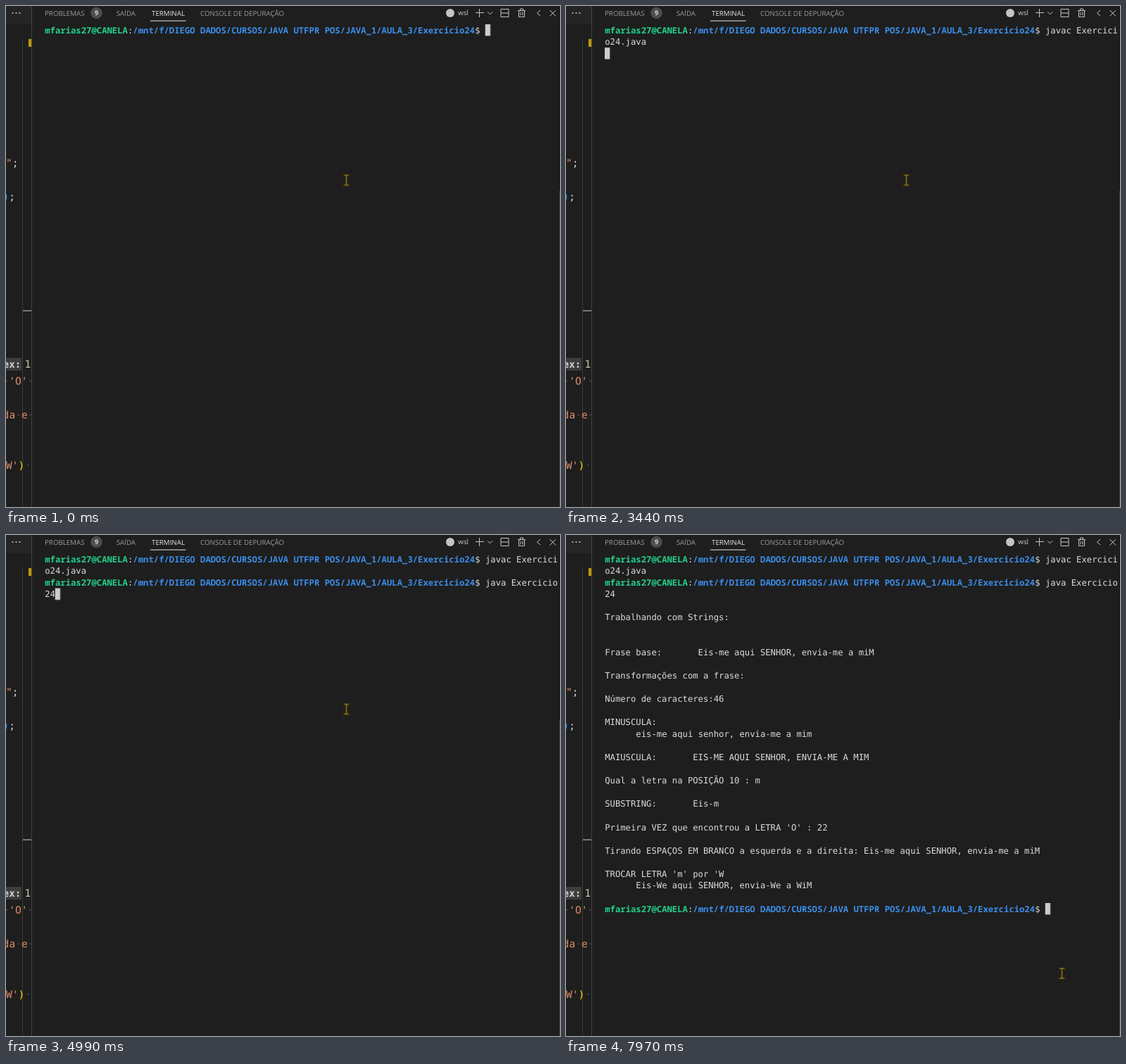
An HTML page that plays this animation: 787 px wide and 712 px high, repeating every 8000 ms.

```html
<!DOCTYPE html>
<html lang="pt-BR">
<head>
<meta charset="utf-8">
<title>Terminal</title>
<style>
  html, body { margin: 0; width: 100%; height: 100%; overflow: hidden; background: #1e1e1e; }
  svg { display: block; --cw: 7.362px; --lh: 16.567px; }
  text { white-space: pre; text-rendering: geometricPrecision; }

  .tabs { font: 9.75px "Open Sans", "Noto Sans", sans-serif; fill: #9d9d9d; }
  .tabs .on { fill: #e7e7e7; }
  .icons { fill: none; stroke: #c5c5c5; stroke-width: 1; }
  .code { font: 14.6px "DejaVu Sans Mono", "Noto Sans Mono", monospace; fill: #d4d4d4; }
  .str { fill: #dd8c6a; }
  .dot { fill: #484848; }
  .term { font: 12.23px "DejaVu Sans Mono", "Noto Sans Mono", monospace; fill: #dcdcdc; }
  .user, .path { font: 700 12.27px "Noto Sans Mono", "DejaVu Sans Mono", monospace; }
  .user { fill: #23d18b; }
  .path { fill: #3b8eea; }

  .run, .block, .mouse { animation: 8s step-end infinite; }
  .java1 { animation-name: java1; }
  .javac1 { animation-name: javac1; }
  .prompt2 { animation-name: prompt2; }
  .javac2 { animation-name: javac2; }
  .java2 { animation-name: java2; }
  .output { animation-name: output; }
  .block { fill: #cccccc; animation-name: block; }
  .mouse { fill: none; stroke: #c79a0c; stroke-width: 1.1; animation-name: mouse; }

  @keyframes java1 { 0%, 19.5%, 100% { opacity: 0 } 1.5% { opacity: 1 } }
  @keyframes javac1 { 0% { opacity: 0 } 19.5%, 100% { opacity: 1 } }
  @keyframes prompt2 { 0% { opacity: 0 } 50.875%, 100% { opacity: 1 } }
  @keyframes javac2 { 0%, 62.375%, 100% { opacity: 0 } 55.875% { opacity: 1 } }
  @keyframes java2 { 0% { opacity: 0 } 62.375%, 100% { opacity: 1 } }
  @keyframes output { 0% { opacity: 0 } 68.75%, 100% { opacity: 1 } }

  @keyframes block {
    0% { transform: translate(calc(85 * var(--cw)), 0px) }
    1.5% { transform: translate(calc(2 * var(--cw)), var(--lh)) }
    19.5% { transform: translate(calc(9 * var(--cw)), var(--lh)) }
    43% { transform: translate(0px, calc(2 * var(--lh))) }
    50.875% { transform: translate(calc(85 * var(--cw)), calc(2 * var(--lh))) }
    55.875% { transform: translate(calc(9 * var(--cw)), calc(3 * var(--lh))) }
    62.375% { transform: translate(calc(2 * var(--cw)), calc(3 * var(--lh))) }
    68.75%, 100% { transform: translate(calc(85 * var(--cw)), calc(30 * var(--lh))) }
  }
  @keyframes mouse {
    0% { transform: translate(483.5px, 247.5px) }
    91.75% { transform: translate(566px, 366px) }
    93.25% { transform: translate(641.5px, 478px) }
    95.125% { transform: translate(662px, 522px) }
    96.625% { transform: translate(683px, 570px) }
    98.125% { transform: translate(697px, 606px) }
    99.625%, 100% { transform: translate(704.5px, 623px) }
  }
</style>
</head>
<body>
<svg width="787" height="712" viewBox="0 0 787 712">
  <rect width="787" height="712" fill="#1e1e1e"/>

  <!-- editor edge -->
  <rect width="36" height="25.5" fill="#252526"/>
  <g fill="#c5c5c5">
    <circle cx="9.5" cy="10" r="1.1"/><circle cx="14.5" cy="10" r="1.1"/><circle cx="19.5" cy="10" r="1.1"/>
  </g>
  <rect x="23" y="48" width="1" height="664" fill="#3a3a3a"/>
  <rect x="32" y="47" width="4" height="11" fill="#bf9a06"/>
  <rect x="24" y="432.4" width="12" height="1.5" fill="#959595"/>
  <rect y="500" width="22" height="18" fill="#3d3d3d"/>
  <g class="code">
    <text x="0" y="228" class="str">"</text><text x="8.7" y="228">;</text>
    <text x="-4.4" y="276" fill="#179fff">)</text><text x="4.2" y="276">;</text>
    <text x="-4.2" y="514" font-size="14" font-weight="700">ex:</text>
    <text x="26.5" y="514" fill="#b5cea8">1</text>
    <text x="4.3" y="538" class="str">'O'</text>
    <text x="-4.4" y="586" class="str">da e</text>
    <text x="0" y="657.5" class="str">W'</text><text x="17.6" y="657.5" fill="#ffd700">)</text>
  </g>
  <g class="dot">
    <circle cx=".6" cy="533" r="1.2"/><circle cx="34.6" cy="533" r="1.2"/>
    <circle cx="17.8" cy="581" r="1.2"/><circle cx="34.6" cy="581" r="1.2"/>
    <circle cx="31.5" cy="653" r="1.2"/>
  </g>
  <rect x="36" width="1" height="712" fill="#444444"/>
  <rect x="786" width="1" height="263" fill="#161616"/>
  <rect x="786" y="263" width="1" height="449" fill="#424242"/>

  <!-- panel header -->
  <g class="tabs">
    <text x="55" y="13.6">PROBLEMAS</text>
    <circle cx="128.5" cy="10" r="8.3" fill="#4d4d4d"/>
    <text x="128.5" y="13.3" text-anchor="middle" font-size="9" font-weight="600" fill="#ffffff">9</text>
    <text x="156.7" y="13.6">SAÍDA</text>
    <text x="207" y="13.6" class="on">TERMINAL</text>
    <rect x="205" y="20.6" width="50.5" height="1" fill="#e7e7e7"/>
    <text x="276" y="13.6">CONSOLE DE DEPURAÇÃO</text>
    <text x="642.3" y="13.2" fill="#cccccc">wsl</text>
  </g>
  <circle cx="631" cy="10" r="6" fill="#c5c5c5"/>
  <g class="icons">
    <path d="M667 9.5h12M672.5 4v12M684 8.3l3.6 3.6 3.6-3.6"/>
    <path d="M703 4.5h11v11h-11zM703 10h11"/>
    <path d="M727 6.5h11M730.5 6v-2h4v2M728.5 6.5v9h8v-9M731 8.5v5M734 8.5v5"/>
    <path d="M759 6l-4.5 4 4.5 4M772.5 6l8.5 8.5M781 6l-8.5 8.5"/>
  </g>

  <g class="term" id="term"></g>
  <rect class="block" x="55" y="26" width="7.3" height="16.4"/>
  <path class="mouse" d="M-3.8 -7h7.6M0 -7v14M-3.8 7h7.6"/>
</svg>
<script>
  const NS = "http://www.w3.org/2000/svg";
  const CELL = 7.362, LINE = 16.567, LEFT = 55.2, BASE = 38.5;
  const term = document.getElementById("term");

  function group(cls) {
    const g = document.createElementNS(NS, "g");
    if (cls) g.setAttribute("class", "run " + cls);
    return term.appendChild(g);
  }

  function put(parent, row, col, str, cls = "") {
    const t = document.createElementNS(NS, "text");
    t.setAttribute("x", LEFT + col * CELL);
    t.setAttribute("y", BASE + row * LINE);
    t.setAttribute("class", cls);
    t.textContent = str;
    parent.appendChild(t);
  }

  function prompt(parent, row) {
    const user = "mfarias27@CANELA";
    const path = "/mnt/f/DIEGO DADOS/CURSOS/JAVA UTFPR POS/JAVA_1/AULA_3/Exercicio24";
    put(parent, row, 0, user, "user");
    put(parent, row, user.length, ":");
    put(parent, row, user.length + 1, path, "path");
    put(parent, row, user.length + 1 + path.length, "$");
  }

  // A command starts after the prompt and wraps at column 99.
  function command(cls, row, str) {
    const g = group(cls);
    put(g, row, 85, str.slice(0, 14));
    put(g, row + 1, 0, str.slice(14));
  }

  prompt(group(), 0);
  command("java1", 0, "java Exercicio24");
  command("javac1", 0, "javac Exercicio24.java");
  prompt(group("prompt2"), 2);
  command("javac2", 2, "javac Exercicio24.java");
  command("java2", 2, "java Exercicio24");

  const lines = `Trabalhando com Strings:


Frase base:       Eis-me aqui SENHOR, envia-me a miM

Transformações com a frase:

Número de caracteres:46

MINUSCULA:
      eis-me aqui senhor, envia-me a mim

MAIUSCULA:       EIS-ME AQUI SENHOR, ENVIA-ME A MIM

Qual a letra na POSIÇÃO 10 : m

SUBSTRING:       Eis-m

Primeira VEZ que encontrou a LETRA 'O' : 22

Tirando ESPAÇOS EM BRANCO a esquerda e a direita: Eis-me aqui SENHOR, envia-me a miM

TROCAR LETRA 'm' por 'W
      Eis-We aqui SENHOR, envia-We a WiM`.split("\n");

  const out = group("output");
  lines.forEach((s, i) => {
    const str = s.trimStart();
    if (str) put(out, 5 + i, s.length - str.length, str);
  });
  prompt(out, 30);
</script>
</body>
</html>
```
